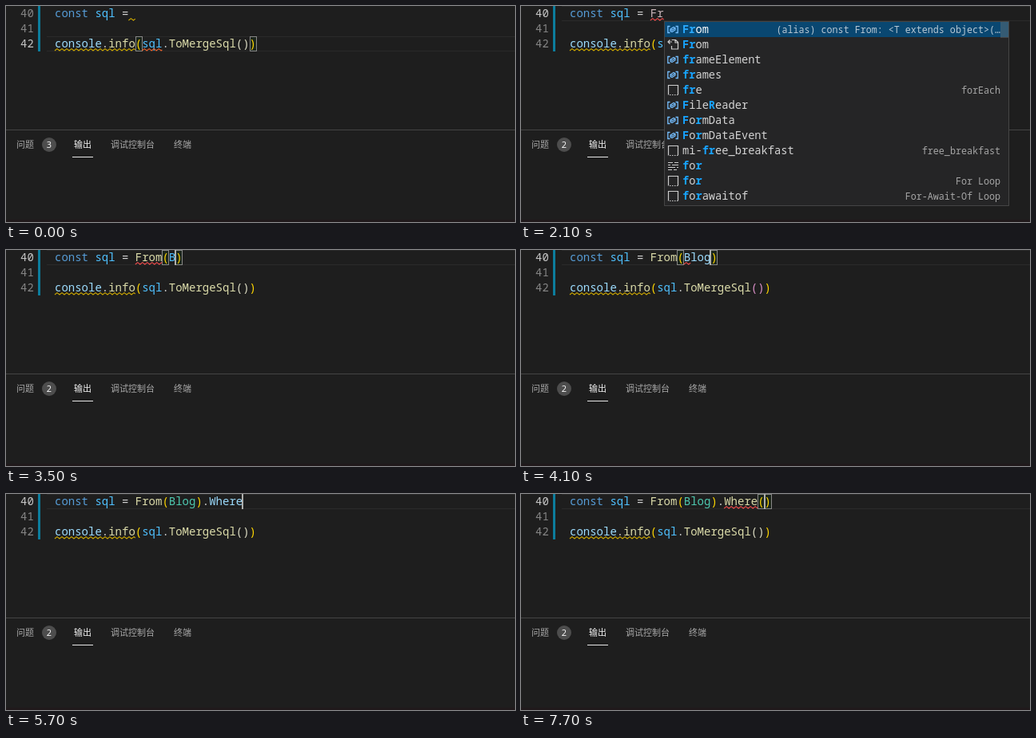
An HTML page for the animation above (8000 ms loop, 637 px wide and 271 px high).

```html
<!DOCTYPE html>
<html lang="zh">
<head>
<meta charset="utf-8">
<style>
  html, body { margin: 0; width: 100%; height: 100%; overflow: hidden; background: #1e1e1e; }
  svg { display: block; width: 637px; height: 271px; }
  text { white-space: pre; font: 500 14px "Noto Sans Mono", "DejaVu Sans Mono", monospace; font-variant-ligatures: none; }
  .item { font-size: 13.7px; }
  .hit { font-weight: 700; }
  .detail { font-size: 11.7px; }
  .tab { font: 500 11px "Noto Sans CJK SC", "Noto Sans CJK", sans-serif; }
  .badge { font: 11px "Open Sans", "Noto Sans", sans-serif; }
</style>
</head>
<body>
<svg id="stage" viewBox="0 0 637 271"></svg>
<script>
const LOOP = 8000, CH = 8.4, ROW = 19, LEFT = 61;
const C = {
  key: '#569cd6', konst: '#4fc1ff', name: '#9cdcfe', fn: '#dcdcaa', type: '#4ec9b0',
  plain: '#d4d4d4', gold: '#ffd700', pink: '#da8fc8', soft: '#dcdcc4', red: '#f14c4c', warn: '#cca700'
};

const suggest = {
  from: [
    ['var', 'From', '(alias) const From: <T extends object>(…'],
    ['ref', 'From'], ['var', 'frameElement'], ['var', 'frames'],
    ['snip', 'fre', 'forEach'], ['var', 'FileReader'], ['var', 'FormData'],
    ['var', 'FormDataEvent'], ['snip', 'mi-free_breakfast', 'free_breakfast'],
    ['word', 'for'], ['snip', 'for', 'For Loop'], ['snip', 'forawaitof', 'For-Await-Of Loop']
  ],
  blog: [
    ['var', 'Blog', 'class Blog'],
    ...['Blob', 'BlobEvent', 'Boolean', 'BigInt', 'BarProp', 'BaseAudioContext',
      'BeforeUnloadEvent', 'BiquadFilterNode', 'BroadcastChannel'].map(n => ['var', n]),
    ['word', 'break'], ['ref', 'Buffer']
  ],
  method: [
    ['cube', 'FullJoin', '(method) SqlExpr<Blog>.FullJoin<T1>(tab…'],
    ...['InnerJoin', 'Join', 'LeftJoin', 'RightJoin', 'Select', 'ToMergeSql', 'ToSql', 'Where'].map(n => ['cube', n])
  ],
  where: [['cube', 'Where', '(method) SqlExpr<Blog>.Where(expr: (e: …']]
};

// Each step overrides part of the state before it.
const steps = [
  [0, { code: [], line: 42, caret: -1, boxes: [12, 29], marks: [[11, 12, C.warn]], sqlMark: true,
        badge: 3, menu: null, inner: C.soft }],
  [600, { line: 40, caret: 12, boxes: [] }],
  [1000, { caret: -1 }],
  [1400, { code: [['F', C.name]], caret: 13, marks: [] }],
  [1500, { code: [['Fr', C.name]], caret: 14 }],
  [1600, { menu: ['from', 179, 'fr'] }],
  [2000, { code: [['Fr', '#c8b4b8']], caret: -1, badge: 2, sqlMark: false, marks: [[12, 14, C.red]] }],
  [2200, { code: [['From', C.name]], caret: 16, menu: null, marks: [] }],
  [2300, { code: [['From', C.fn]] }],
  [2600, { caret: -1 }],
  [2800, { code: [['From', C.fn], ['()', C.gold]], caret: 17, boxes: [16, 17] }],
  [3200, { marks: [[12, 16, C.red]] }],
  [3300, { caret: -1 }],
  [3500, { code: [['From', C.fn], ['(', C.gold], ['B', C.konst], [')', C.gold]], caret: 18, boxes: [16, 18] }],
  [3600, { menu: ['blog', 212, 'b'] }],
  [4000, { code: [['From', C.fn], ['(', C.gold], ['Blog', C.name], [')', C.gold]], caret: 21, boxes: [16, 21],
           menu: null, marks: [], inner: C.pink }],
  [4100, { marks: [[17, 18, C.red]] }],
  [4500, { code: [['From', C.fn], ['(', C.gold], ['Blog', C.type], [')', C.gold]], caret: -1, marks: [], badge: 1 }],
  [4900, { caret: 22 }],
  [5200, { code: called('.'), caret: 23, boxes: [], menu: ['method', 254, ''], inner: C.soft }],
  [5500, { code: called('.', 'W', C.name), caret: 24, menu: ['where', 254, 'w'] }],
  [5700, { code: called('.', 'Where', C.name), caret: 28, menu: null, badge: 2 }],
  [6100, { marks: [[23, 28, C.red]] }],
  [6300, { code: called('.', 'Where', C.fn) }],
  [6600, { caret: -1 }],
  [7000, { code: [...called('.', 'Where', C.fn), ['()', C.gold]], caret: 29, boxes: [28, 29], marks: [] }],
  [7400, { marks: [[23, 28, C.red]] }],
  [7500, { caret: -1 }],
  [7700, { caret: 29 }]
];

function called(dot, name, color) {
  const out = [['From', C.fn], ['(', C.gold], ['Blog', C.type], [')', C.gold], [dot, C.plain]];
  return name ? [...out, [name, color]] : out;
}

const esc = s => s.replace(/&/g, '&amp;').replace(/</g, '&lt;');
const text = (x, y, s, fill, cls = '', more = '') =>
  `<text x="${x}" y="${y}" fill="${fill}" class="${cls}" ${more}>${esc(s)}</text>`;
const rect = (x, y, w, h, fill, more = '') =>
  `<rect x="${x}" y="${y}" width="${w}" height="${h}" fill="${fill}" ${more}/>`;
const path = (d, color, w = 1) => `<path d="${d}" fill="none" stroke="${color}" stroke-width="${w}"/>`;
const colX = c => LEFT + c * CH;

function tokens(list, top) {
  let col = 0;
  return list.map(([s, color]) => {
    const out = text(colX(col).toFixed(1), top + 14, s, color);
    col += s.length;
    return out;
  }).join('');
}

function wave(from, to, top, color) {
  const end = colX(to);
  let x = colX(from), d = `M${x} ${top + 18}`, up = true;
  while (x < end) {
    const dx = Math.min(3, end - x);
    x += dx;
    d += `l${dx} ${up ? -dx * 0.8 : dx * 0.8}`;
    up = !up;
  }
  return path(d, color, 1.1);
}

const bracketBox = (col, top) =>
  rect(Math.round(colX(col)) + 0.5, top + 0.5, 8, 18, 'rgba(0,100,0,.1)', 'stroke="#888"');

const icons = {
  var: c => path('M3.5 3.5H.8v8h2.7M10.5 3.5h2.7v8h-2.7', c, 1.3) +
    path('M4 7l4-2.5 2 1.2v2.3l-4 2.5-2-1.2zM4 7l2 1.2 4-2.5', c, 1.2),
  ref: c => path('M5.5 1.5h5l3 3v8.5h-8v-4M10 1.5v3.5h3.5M1 4h5M3.5 1.5L1 4l2.5 2.5', c, 1.2),
  snip: c => path('M1.5 13.5v-12h12v12', c, 1.2) + path('M3 13.5h1.5M6 13.5h1.5M9 13.5h1.5M12 13.5h1', c, 1.2),
  word: c => path('M1 3.5h6M9 3.5h5M1 6.5h3M6 6.5h8M1 9.5h9M12 9.5h2M1 12.5h5M8 12.5h4', c),
  cube: c => path('M7 1.5l5.5 3v6L7 13.5l-5.5-3v-6zM1.5 4.5L7 7.5l5.5-3M7 7.5v6', c, 1.2)
};
const iconColor = { var: '#75beff', ref: '#cccccc', snip: '#cccccc', word: '#cccccc', cube: '#b180d7' };

function label(s, query, on) {
  let q = 0;
  return [...s].map(ch => {
    const hit = q < query.length && ch.toLowerCase() === query[q];
    if (hit) q++;
    return hit ? `<tspan class="hit" fill="${on ? '#2aaaff' : '#18a3ff'}">${ch}</tspan>` : ch;
  }).join('');
}

function popup([key, x, query]) {
  const list = suggest[key];
  const rows = list.map(([kind, name, detail], i) => {
    const y = 20 + i * ROW, on = i === 0;
    return (on ? rect(x + 1, y, 430, ROW, '#094771') : '') +
      `<g transform="translate(${x + 4} ${y + 2})">${icons[kind](on && kind === 'cube' ? '#ffffff' : iconColor[kind])}</g>` +
      `<text x="${x + 23}" y="${y + 14}" class="item" fill="${on ? '#ffffff' : C.plain}">${label(name, query, on)}</text>` +
      (detail ? text(x + 421, y + 13.5, detail, on ? '#b8c8d4' : '#a6a6a6', 'detail', 'text-anchor="end"') : '');
  }).join('');
  const thumb = list.length > 9 ? rect(x + 421, 20, 10, 20, 'rgba(121,121,121,.4)') : '';
  return rect(x + 0.5, 19.5, 431, list.length * ROW + 3, '#252526', 'stroke="#454545"') + rows + thumb;
}

function editor(s) {
  const top = (s.line - 40) * ROW;
  let out = rect(51, top, 586, 1, '#2a2a2a') + rect(51, top + 18, 586, 1, '#2a2a2a') + rect(40, 0, 3, 57, '#0c7d9d');
  for (let n = 40; n <= 42; n++)
    out += text(18, (n - 40) * ROW + 14, String(n), n === s.line ? '#c6c6c6' : '#858585');
  out += s.boxes.map(c => bracketBox(c, top)).join('');
  out += tokens([['const', C.key], [' ', C.plain], ['sql', C.konst], [' = ', C.plain], ...s.code], 0);
  out += tokens([['console', C.name], ['.', C.plain], ['info', C.fn], ['(', C.gold], ['sql', C.konst],
    ['.', C.plain], ['ToMergeSql', C.fn], ['()', s.inner], [')', C.gold]], 38);
  out += s.marks.map(([a, b, c]) => wave(a, b, 0, c)).join('');
  out += wave(0, 12, 38, C.warn);
  if (s.sqlMark) out += wave(13, 16, 38, '#e8622c');
  if (s.caret >= 0) out += rect(Math.round(colX(s.caret)) - 1, 0, 2, ROW, '#aeafad');
  return out;
}

function panel(s) {
  const dim = '#a8a8a8';
  return rect(0, 155, 637, 1, '#444444') + rect(0, 268, 637, 3, '#20191b') +
    text(13, 178, '问题', dim, 'tab') + text(85, 178, '输出', '#f0f0f0', 'tab') +
    text(131, 178, '调试控制台', dim, 'tab') + text(210, 178, '终端', dim, 'tab') +
    rect(83, 189, 26, 1, '#e7e7e7') + '<circle cx="54" cy="174" r="9" fill="#4d4d4d"/>' +
    text(54, 178, String(s.badge), '#ffffff', 'badge', 'text-anchor="middle"');
}

const stage = document.getElementById('stage');
let shown = -1;

function draw(now) {
  const t = now % LOOP;
  const past = steps.filter(([at]) => at <= t);
  if (past.length !== shown) {
    shown = past.length;
    const s = Object.assign({}, ...past.map(p => p[1]));
    stage.innerHTML = rect(0, 0, 637, 271, '#1e1e1e') + editor(s) + panel(s) + (s.menu ? popup(s.menu) : '');
  }
}

const start = performance.now();
function tick() {
  draw(performance.now() - start);
  requestAnimationFrame(tick);
}
tick();
</script>
</body>
</html>
```
